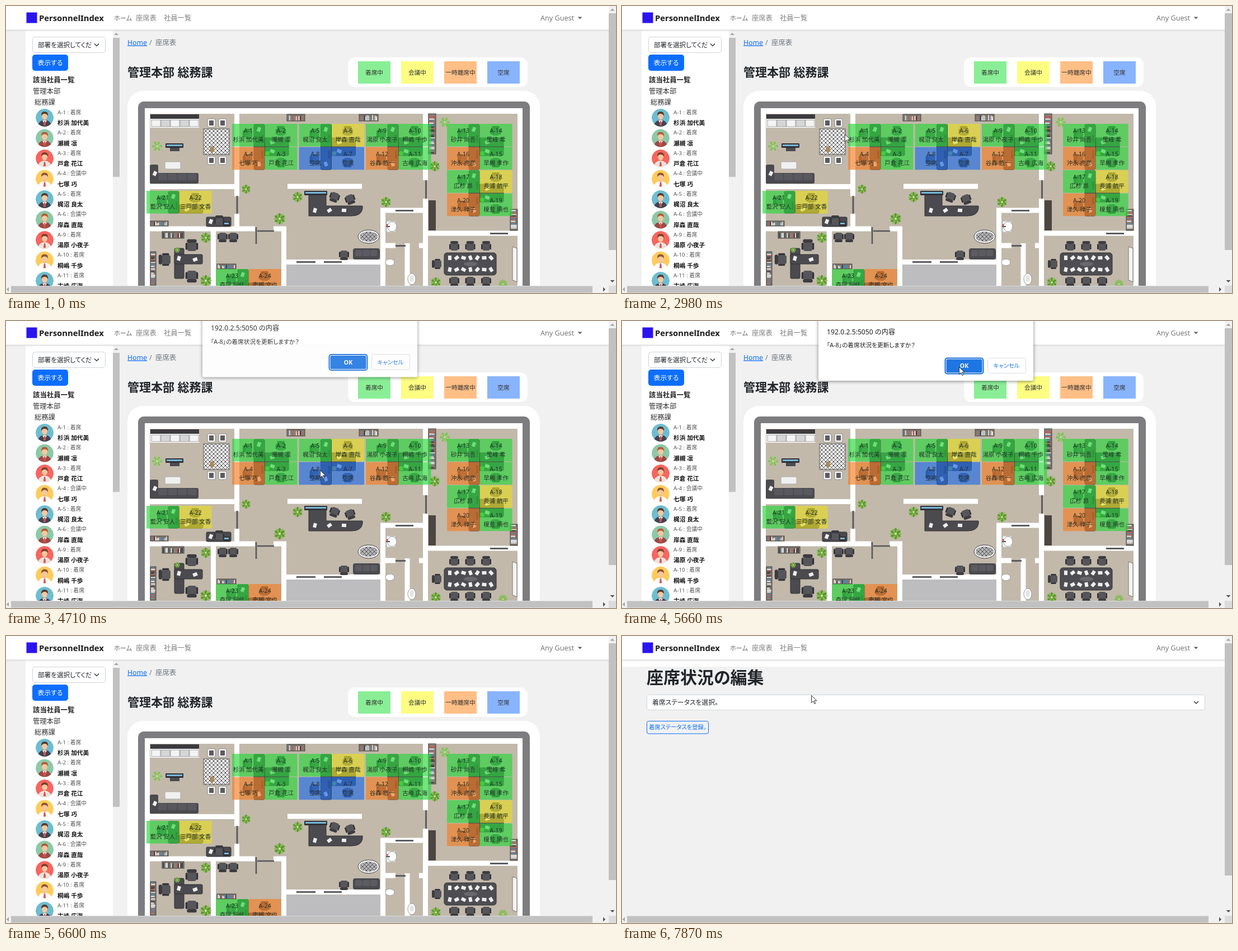
Recreate the animation shown at these times as an HTML page. Size 1090 by 514 pixels, loop 8000 ms.

```html
<!DOCTYPE html>
<html lang="ja">
<head>
<meta charset="utf-8">
<title>座席表</title>
<style>
  html, body { margin: 0; width: 100%; height: 100%; overflow: hidden; background: #f1f1f1; }
  svg { display: block; width: 1090px; height: 514px; }
  text { font-family: "Noto Sans", "Noto Sans CJK JP", sans-serif; font-feature-settings: "palt"; white-space: pre; }
</style>
</head>
<body>
<svg id="stage" viewBox="0 0 1090 514"></svg>
<script>
const LOOP = 8000, TICK = 69;
const BLUE = '#0d6efd', DARK = '#4a4a4f', EDGE = 'stroke="#303034"';
const MIDDLE = 'text-anchor="middle"', BOLD = 'font-weight="700"';

// Drawing helpers: each returns SVG markup
const box = (x, y, w, h, fill, more = '') =>
  `<rect x="${x}" y="${y}" width="${w}" height="${h}" fill="${fill}" ${more}/>`;
const oval = (x, y, rx, ry, fill, more = '') =>
  `<ellipse cx="${x}" cy="${y}" rx="${rx}" ry="${ry}" fill="${fill}" ${more}/>`;
const dot = (x, y, r, fill) => oval(x, y, r, r, fill);
const path = (d, fill, more = '') => `<path d="${d}" fill="${fill}" ${more}/>`;
const line = (d, color, width) => path(d, 'none', `stroke="${color}" stroke-width="${width}"`);
const group = (x, y, inner, turn = 0, more = '') =>
  `<g transform="translate(${x} ${y}) rotate(${turn})" ${more}>${inner}</g>`;
const label = (x, y, size, text, fill = '#212529', more = '') =>
  `<text x="${x}" y="${y + size * .37}" font-size="${size}" fill="${fill}" ${more}>${text}</text>`;
const repeat = (n, make) => Array.from({ length: n }, (_, i) => make(i)).join('');
const chevron = (x, y) => line(`M${x - 4} ${y - 2}l4 4 4-4`, '#343a40', 1.5);
const triangle = (x, y, turn, fill) => group(x, y, path('M-4 2h8l-4-4z', fill), turn);

let seed = 7;
const random = () => (seed = seed * 16807 % 2147483647) / 2147483647;

// Furniture
const plant = (x, y, r = 9, fill = '#5c962f') => group(x, y, dot(0, 0, r * .55, '#4b7a2a') +
  repeat(12, i => oval(r * .6, 0, r * .42, r * .2, i % 2 ? fill : '#8abc55', `transform="rotate(${i * 30})"`)) +
  dot(0, 0, r * .2, '#dbe8b4'));
const chair = (x, y, turn = 0, size = 1) => group(x, y, `<g transform="scale(${size})">` +
  box(-9, -4, 3, 10, '#333338', 'rx="1.5"') + box(6, -4, 3, 10, '#333338', 'rx="1.5"') +
  box(-6.5, -5, 13, 13, '#55555a', 'rx="3"') + box(-7, -9, 14, 5, '#3c3c41', 'rx="2.5"') + '</g>', turn);
const table = (x, y, w, h) => box(x, y, w, h, DARK, 'rx="2" ' + EDGE);
const paper = (x, y, turn) => group(x, y, box(-3, -4, 6, 8, '#eee'), turn);
const screen = (x, y, w) => box(x, y, w, 8, '#323237', 'rx="1"') + box(x + 2, y + 2, w - 4, 3, '#75b8d8');
const hues = ['#fff', '#e8e2d8', '#3a3a3e', '#8d8780', '#c9605a', '#5b87a8'];
function shelf(x, y, length, depth, turn = 0) {
  return group(x, y, box(0, 0, length, depth, '#77716a', 'stroke="#4f4a45"') + repeat(length / 2.4 - 1, i => {
    const gap = 1 + random() * 3;
    return box(1.5 + i * 2.4, gap, 1.7, depth - gap - 1, hues[Math.floor(random() * 6)]);
  }), turn);
}

// People and seats
const names = ('杉浜 加代美,瀬槻 凛,戸倉 花江,七塚 巧,梶沼 良太,岸森 直哉,空席,空席,湯原 小夜子,桐嶋 千歩,古峰 広海,谷森 悠一,' +
  '砂井 尚吾,里峰 希,早槻 孝作,沖永 虎彦,広杉 昴,長浦 航平,榎並 順也,津久 律子,藍沢 安人,三戸部 文香,森塚 朋代,南槻 文也').split(',');
const states = 'SSSASMEESSSASSSASMSASMSA';
const seatColors = { S: '#2bd63c', M: '#e5dc27', A: '#f37f25', E: '#226ce4' };

function desks(x, y, four) {
  const cx = x + 58, cy = y + 41;
  const half = chair(cx - 30, y + 18, 270) + chair(cx + 29, y + 13) + paper(cx - 10, y + 10, 20) +
    paper(cx + 14, cy - 8, 70) + box(cx - 6, y + 20, 4, 14, '#29292d');
  return table(cx - 19, y + 1, 19, four ? 81 : 39) + table(cx, cy - 16, 43, four ? 32 : 15) + half +
    (four ? group(0, 2 * cy, `<g transform="scale(1 -1)">${half}</g>`) : '') + dot(cx + 5, cy + 12, four ? 4 : 0, '#7db53f');
}
// Seats are numbered clockwise from the top left
const block = (x, y, first, count) => desks(x, y, count > 2) + repeat(count, i => {
  const id = first + i, lower = i > 1, right = i === 1 || i === 2;
  const left = x + right * 58.6, top = y + lower * 41.6;
  return box(left, top, 58, 40.6, seatColors[states[id - 1]], 'opacity=".66"') +
    label(left + 29, top + 12.5, 10.5, 'A-' + id, '#26302b', MIDDLE) +
    label(left + 29, top + 28.5, 10.5, names[id - 1], '#26302b', MIDDLE);
});

function kitchen() {
  return box(258, 194, 87, 24, '#fff') + box(258, 194, 87, 8, '#3b3b3f') +
    repeat(5, i => box(260 + i * 17, 204, 16, 12, i % 2 ? '#d4d6d8' : '#f4f4f4', 'stroke="#8c8c8c" stroke-width=".8"')) +
    repeat(4, i => group(360 + i % 2 * 20, i > 1 ? 269 : 202,
      box(0, 0, 14, 15, '#f4f4f4', 'rx="2" stroke="#8a8a8a"') + box(3, 3, 8, 9, '#5b5b60'))) +
    box(353, 220, 46, 46, 'url(#lattice)', 'stroke="#555"') + oval(368, 257, 4, 6, '#a98a5d') +
    plant(270, 251, 9, '#a9c88e') + screen(285, 246, 32) + box(293, 254, 17, 6, DARK) +
    box(257, 284, 15, 34, DARK, 'rx="3"') + box(257, 299, 87, 19, DARK, 'rx="3"') +
    repeat(4, i => box(272 + i * 17.5, 300, 16, 12, '#58585e', 'rx="2"')) +
    box(284, 279, 28, 13, '#f1f1f1', 'rx="2" stroke="#aaa"') + paper(266, 300, 25);
}

function lounge() {
  return path('M541 333h31v25h65v5q-2 13-20 13h-76z', DARK, EDGE) + screen(533, 331, 41) +
    repeat(3, i => paper(552 + i * 26, 366, 15 + i * 40)) + chair(587, 342, 200) + chair(615, 346, 160) +
    oval(648, 413, 19, 12, '#f3f3f3', 'stroke="#444"') + oval(648, 413, 16, 9, '#6a6a6e') + oval(648, 413, 16, 9, 'url(#lattice)', 'opacity=".5"') +
    box(620, 434, 48, 20, DARK, 'rx="4"') + repeat(3, i => box(624 + i * 13.5, 437, 12.5, 11, '#5b5b61', 'rx="2"')) +
    chair(604, 446, 180) + plant(429, 328, 8) + plant(521, 342) + plant(489, 381, 10) + plant(679, 351) +
    plant(766, 287) + plant(784, 208, 9, '#9fc78a');
}

function sideRooms() {
  return table(358, 378, 44, 17) + chair(381, 384) + paper(366, 386, 20) + screen(388, 386, 12) +
    table(301, 434, 17, 54) + table(301, 445, 50, 17) + chair(332, 429, 0, 1.25) + chair(332, 484, 180, 1.25) +
    chair(284, 454, 270, 1.25) + paper(309, 452, 15) + paper(338, 454, 70) + plant(306, 437, 5) +
    plant(357, 415) + plant(357, 492, 10) + chair(387, 414, 180) + chair(406, 414, 180) +
    line('M447 396v30M449 403h30', '#56565a', 2.5);
}

function rightRooms() {
  const porcelain = 'stroke="#999"';
  return box(755, 348, 13, 54, '#4b4641') + box(680, 385, 16, 20, '#f5f5f5', 'rx="2" stroke="#bbb"') +
    oval(690, 395, 8, 9, '#fff', porcelain) + line('M679 395h7', '#555', 2) + dot(681, 392, 1.5, '#d33') +
    oval(686, 459, 8, 6, '#fff', porcelain) + oval(725, 489, 7, 10, '#fff', porcelain) + oval(725, 488, 4, 6, '#e4e4e4') +
    repeat(3, i => chair(801 + i * 28.5, 430) + chair(801 + i * 28.5, 493, 180)) + chair(770, 462, 270) +
    box(783, 442, 93, 40, '#4d4d52', 'rx="5" ' + EDGE) +
    repeat(14, i => paper(793 + i % 7 * 12.3, i > 6 ? 472 : 451, i * 53)) + oval(830, 462, 12, 4, '#68686d') +
    path('M905 431l8 3v60l-8-3z', '#f4f4f4', 'stroke="#77716b"') + plant(768, 495) + plant(888, 498, 8, '#8fbd6d');
}

function floorPlan() {
  const walls = 'M412.5 193V341M412.5 372V400M257 323.500H417M257 399H445M478 399H501M370.500 395V502M496.500 395V502' +
    'M500 458.500H669M503 323H636M673.500 362V502M669 366H754M749.500 193V312M749.500 345V502M754 407H914M678 429H696M738 429H746M717 425V502';
  const doors = 'M413 340V372M519 458.500H553M568 458.500H600M696 366.500H728M750.500 312V345M865 407.500H897M696 429.500H714';
  return box(217, 152, 737, 400, '#fff', 'rx="28"') + box(236, 171, 700, 400, '#7d7d7f', 'rx="10"') +
    box(248, 183, 675, 340, '#fff') + box(257, 193, 657, 320, '#c2b9ab') + box(500, 462, 169, 40, '#bdbdbf') +
    line(walls, '#fff', 9) + line(doors, '#5c5c60', 3) +
    shelf(502, 194, 32, 12) + shelf(631, 194, 34, 12) + shelf(279, 404, 39, 12) + shelf(258, 385, 32, 9) + shelf(377, 462, 34, 9) +
    shelf(768, 193, 72, 13, 90) + shelf(914, 364, 38, 13, 90) + shelf(268, 440, 60, 10, 90) +
    kitchen() + lounge() + sideRooms() + rightRooms() +
    repeat(3, i => block(404 + i * 119.5, 211, 1 + i * 4, i === 1 ? 4 : 4)) + repeat(2, i => block(788, 211 + i * 83, 13 + i * 4, 4)) +
    block(251, 331, 21, 2) + block(375, 471, 23, 2);
}

function avatar(x, y, i) {
  const back = ['#6dbdd2', '#8cc9a8', '#f7665f', '#ffcb5c'][i], suit = ['#3d4654', '#9b4a45', '#e9e4df', '#fff'][i];
  const hair = ['#5b3b2c', '#b55a35', '#7d3f2e', '#8a5632'][i];
  return group(x, y, dot(0, 0, 16, back) + path('M-12 17Q-12 5 0 4Q12 5 12 17z', suit) + box(-2, 1, 4, 6, '#e2ab82') +
    path('M-4 5L0 12L4 5z', '#fff') + path('M-1.3 6h2.6l.8 8h-4.2z', '#d9524a') + oval(0, -3, 5, 6.3, '#f6c79f') +
    path('M-5.8-3Q-7-11 0-11Q7-11 5.8-3Q4-7 0-7Q-4-7-5.8-3z', hair), 0, 'clip-path="url(#round)"');
}

function sidebar() {
  const listed = [1, 2, 3, 4, 5, 6, 9, 10, 11];
  return box(35, 43, 156, 460, '#fff') +
    box(47.5, 55.5, 130, 28, '#fff', 'rx="4.5" stroke="#ced4da"') + label(57, 69.5, 11.6, '部署を選択してくだ') + chevron(162, 69.5) +
    box(47, 87, 64, 29, BLUE, 'rx="5"') + label(79, 101.5, 11.8, '表示する', '#fff', MIDDLE) +
    label(48, 132, 12.4, '該当社員一覧', '#222', BOLD) + label(48, 152, 12.3, '管理本部', '#333') + label(51, 172, 12.3, '総務課', '#333') +
    listed.map((id, i) => {
      const y = 200 + i * 36.5, state = 'AM'.includes(states[id - 1]) ? '会議中' : '着席';
      return avatar(69, y, i % 4) + label(92, y - 10, 9.8, `A-${id} : ${state}`, '#555') + label(92, y + 9.5, 10.7, names[id - 1], '#111', BOLD);
    }).join('') +
    box(191, 43, 12, 460, '#f1f1f1') + box(191, 57, 12, 249, '#c1c1c1') + triangle(197, 50, 0, '#a3a3a3');
}

function seatPage() {
  const legend = { 着席中: '#8aee96', 会議中: '#fdfd82', 一時離席中: '#ffbf86', 空席: '#88b4fd' };
  return label(217, 65, 12.3, 'Home', BLUE, 'text-decoration="underline"') + label(256, 65, 12.3, '/', '#6c757d') + label(267, 65, 12.4, '座席表', '#6c757d') +
    label(217, 118, 21, '管理本部 総務課', '#212529', BOLD) + box(611, 92, 321, 53, '#fff', 'rx="13"') +
    Object.entries(legend).map(([text, fill], i) =>
      box(629 + i * 77, 99, 58, 40, fill) + label(658 + i * 77, 119, 10.7, text, '#333', MIDDLE)).join('') +
    floorPlan() + sidebar() + box(1077, 13, 13, 424, '#c1c1c1');
}

function editPage() {
  return box(0, 43, 1077, 12, '#fff') + label(44, 74, 30, '座席状況の編集', '#212529', BOLD) +
    box(44.5, 105.5, 997, 27, '#fff', 'rx="4.5" stroke="#ced4da"') + label(54, 119, 11.8, '着席ステータスを選択。') + chevron(1026, 119) +
    box(44.5, 152.5, 110, 22.5, 'none', `rx="3" stroke="${BLUE}"`) + label(99.5, 163.5, 10.3, '着席ステータスを登録。', BLUE, MIDDLE) +
    box(1077, 13, 13, 416, '#c1c1c1');
}

const navbar = () => box(0, 42, 1077, 4, 'url(#fade)') + box(0, 0, 1077, 42.5, '#fff') +
  box(36.5, 11.5, 19, 19, '#2a14f0') + label(59, 21.5, 14.8, 'PersonnelIndex', '#1b1b1b', 'font-weight="600"') +
  label(193, 21.5, 11.2, 'ホーム', '#666') + label(232, 21.5, 12.3, '座席表', '#808080') + label(282, 21.5, 12.3, '社員一覧', '#808080') +
  label(955, 21.5, 12.6, 'Any Guest', '#777') + triangle(1025.5, 21.5, 180, '#666');

const scrollbars = () => triangle(1083.5, 6.5, 0, '#a3a3a3') + triangle(1083.5, 493, 180, '#505050') +
  box(0, 501, 1077, 13, '#f1f1f1') + box(1077, 501, 13, 13, '#dcdcdc') + box(9, 501.5, 1039, 12, '#c1c1c1') +
  triangle(3, 507.5, 270, '#a3a3a3') + triangle(1069, 507.5, 90, '#505050');

const dialog = () => box(351, -40, 384, 147, '#fff', 'rx="3" style="filter:drop-shadow(0 1px 3px #0007)"') +
  label(366, 19.5, 12.2, '192.0.2.5:5050 の内容', '#202124') + label(366, 43.5, 10.7, '「A-8」の着席状況を更新しますか？', '#202124') +
  box(577.5, 66.5, 68, 28, '#fff', 'rx="4" stroke="#1a6fdc" stroke-width="2"') + box(579.5, 68.5, 64, 24, '#1f76e2', 'rx="2"') +
  label(611.5, 80.5, 10.5, 'OK', '#fff', MIDDLE + ' font-weight="600"') +
  box(653.5, 66.5, 68, 27, '#fff', 'rx="3" stroke="#dadce0"') + label(687, 80.5, 10.3, 'キャンセル', '#1a73e8', MIDDLE);

document.getElementById('stage').innerHTML = `<defs>
  <clipPath id="round"><circle r="16"/></clipPath>
  <pattern id="lattice" width="7" height="7" patternUnits="userSpaceOnUse"><path d="M0 0h7v7h-7z" fill="#fff"/><path d="M0 0L7 7M7 0L0 7" stroke="#333"/></pattern>
  <linearGradient id="fade" x2="0" y2="1"><stop stop-color="#d2d2d2"/><stop offset="1" stop-color="#d2d2d2" stop-opacity="0"/></linearGradient>
  </defs>` + box(0, 0, 1090, 514, '#f1f1f1') +
  `<g id="seatPage">${seatPage()}</g><g id="editPage">${editPage()}</g>` + navbar() + scrollbars() +
  `<g id="dialog">${dialog()}</g><g id="pointer">` +
  path('M.5.5V13.5l3.2-3 2.2 5 2-.9-2.2-4.8h4.3z', '#fff', 'id="arrow" stroke="#222" stroke-width=".9"') +
  path('M-4-7.5h3l1 1 1-1h3M0-6.5V5.5M-4 6.5h3l1-1 1 1h3', 'none', 'id="beam" stroke="#a335a0" stroke-width="1.3"') + '</g>';

// Pointer strokes: start and end time, then the place reached
const strokes = [
  [310, 520, 705, 281], [720, 850, 261, 166], [1050, 1530, 154, 67], [1600, 1810, 139, 65],
  [1880, 2640, 317, 199], [2710, 2980, 418, 237], [3330, 3960, 573, 267], [4160, 4230, 561, 267],
  [4780, 4900, 558, 293], [5100, 5520, 634, 98], [5590, 5660, 602, 82], [6060, 6530, 355, 109], [7800, 7870, 338, 106]
];
const clamp = v => Math.max(0, Math.min(1, v));

function pointerAt(t) {
  let x = 1165, y = 515;
  for (const [start, end, toX, toY] of strokes) {
    if (t < start) break;
    const count = Math.round((end - start) / TICK) + 1;
    const p = clamp((Math.floor((t - start) / TICK + .03) + 1) / count);
    x += (toX - x) * p;
    y += (toY - y) * p;
  }
  return [x, y];
}

const node = id => document.getElementById(id);
const show = (id, on) => node(id).setAttribute('visibility', on ? 'visible' : 'hidden');
const origin = performance.now();
function draw() {
  const t = (performance.now() - origin) % LOOP;
  const [x, y] = pointerAt(t);
  const open = clamp(Math.min((t - 4570) / 210, (6050 - t) / 140));
  const editing = t >= 6670, present = t < 6600 || editing;
  const onName = !editing && x > 404 && x < 461 && y > 230 && y < 248;
  show('seatPage', !editing);
  show('editPage', editing);
  show('arrow', present && !onName);
  show('beam', present && onName);
  node('pointer').setAttribute('transform', `translate(${x} ${y})`);
  node('dialog').setAttribute('transform', `translate(0 ${-20 * (1 - open)})`);
  node('dialog').setAttribute('opacity', 1 - (1 - open) ** 2);
  requestAnimationFrame(draw);
}
draw();
</script>
</body>
</html>
```
